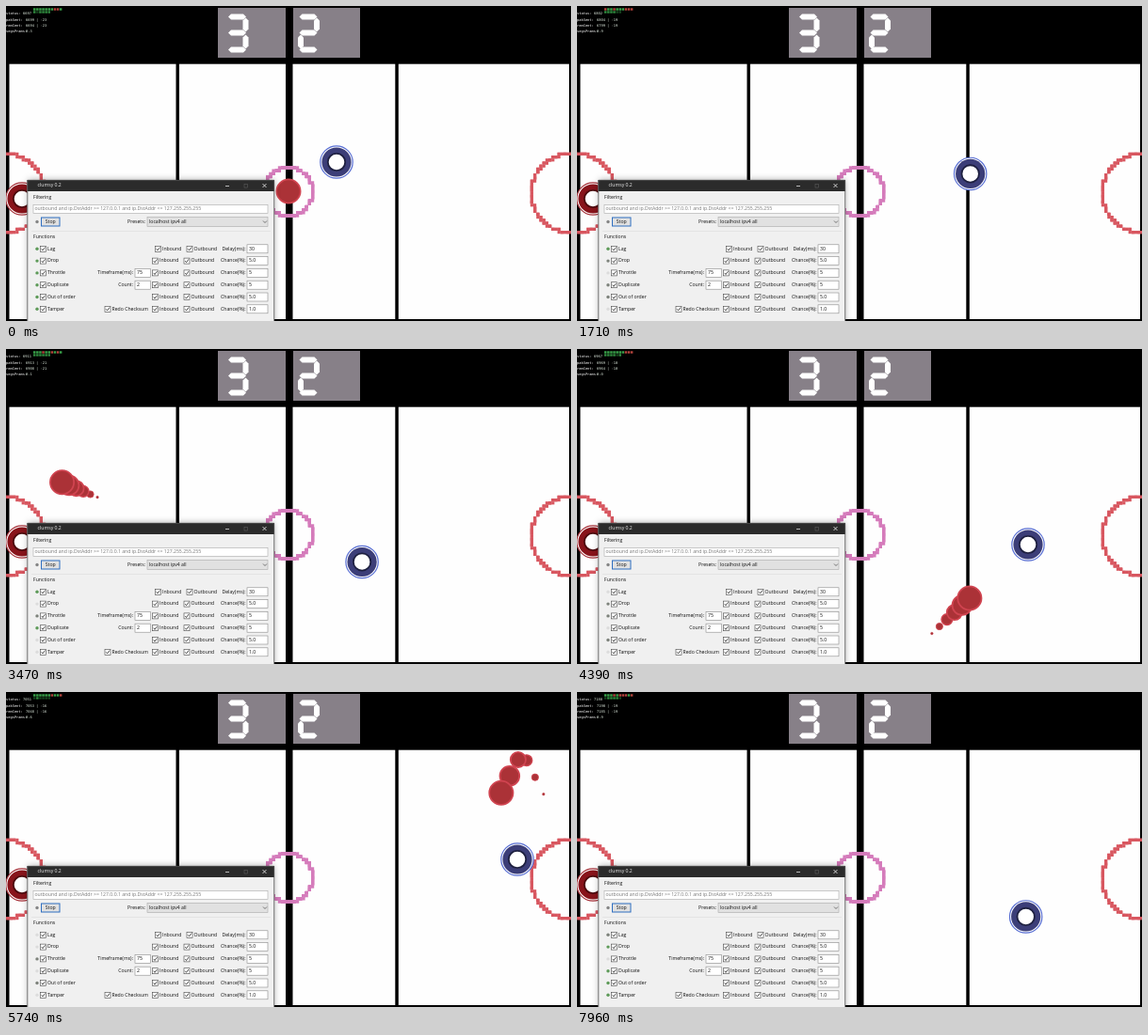
Animation, 600 px wide and 335 px high, one loop 8000 ms. Source, as an HTML page with a canvas:

```html
<!DOCTYPE html>
<html lang="en">
<head>
<meta charset="utf-8">
<title>Air hockey over a bad network</title>
<style>
  html, body { margin: 0; width: 100%; height: 100%; overflow: hidden; background: #000; }
  canvas { display: block; width: 100vw; height: 100vh; }
</style>
</head>
<body>
<canvas id="stage" width="600" height="335"></canvas>
<script>
const ctx = document.getElementById('stage').getContext('2d');
const LOOP = 8000, TICK = 1000 / 60;
const UI = '5.15px "Open Sans", "Noto Sans", sans-serif';
const MONO = '3.7px "DejaVu Sans Mono", "Noto Sans Mono", monospace';

// Each strike sets the puck off in a straight line; the walls reflect it.
const strikes = [
  { at: 0, x: 300, y: 197, vx: 0, vy: 0 },
  { at: 270, x: 300, y: 197, vx: -0.67, vy: -0.3 },
  { at: 683, x: 25, y: 75, vx: 0.24, vy: 0.6 },
  { at: 1000, x: 90, y: 260, vx: 0.16, vy: -0.035 },
  { at: 2100, x: 268, y: 222, vx: 0.08, vy: 0.21 },
  { at: 2870, x: 330, y: 256, vx: -0.45, vy: -0.19 },
  { at: 3560, x: 18, y: 125, vx: 0.48, vy: -0.45 },
  { at: 4470, x: 455, y: 229, vx: 0.1, vy: 0.4 },
  { at: 5600, x: 568, y: 171, vx: 0.54, vy: -1.08 },
  { at: 6300, x: 224, y: 230, vx: -0.05, vy: 0.01 }
];

// Places where the blue player pauses: time, x, y
const stops = [
  [0, 351, 166], [890, 394, 198], [2500, 440, 160], [2870, 352, 240], [4100, 406, 212],
  [4390, 479, 208], [5740, 543, 178], [6530, 318, 203], [LOOP, 477, 239]
];

function reflect(v, low, high) {
  const span = high - low, u = (((v - low) % (2 * span)) + 2 * span) % (2 * span);
  return low + (u < span ? u : 2 * span - u);
}

function puckAt(t) {
  t = Math.max(0, t);
  const { at, x, y, vx, vy } = strikes.findLast(s => s.at <= t);
  return [reflect(x + vx * (t - at), 16, 585), Math.max(72, reflect(y + vy * (t - at), 63, 320))];
}

function malletAt(t) {
  const i = Math.max(1, stops.findIndex(s => s[0] >= t));
  const [t0, x0, y0] = stops[i - 1], [t1, x1, y1] = stops[i];
  const u = (t - t0) / (t1 - t0), eased = u * u * (3 - 2 * u);
  return [x0 + (x1 - x0) * eased, y0 + (y1 - y0) * eased];
}

function noise(a, b) {
  const s = Math.sin(a * 12.9898 + b * 78.233) * 43758.5453;
  return s - Math.floor(s);
}

function rect(x, y, w, h, fill, stroke, width = 0.6) {
  ctx.fillStyle = fill;
  ctx.fillRect(x, y, w, h);
  if (stroke) {
    ctx.strokeStyle = stroke;
    ctx.lineWidth = width;
    ctx.strokeRect(x, y, w, h);
  }
}

function disc(x, y, r, fill, stroke, width = 1) {
  ctx.beginPath();
  ctx.arc(x, y, r, 0, Math.PI * 2);
  ctx.fillStyle = fill;
  ctx.fill();
  if (stroke) {
    ctx.strokeStyle = stroke;
    ctx.lineWidth = width;
    ctx.stroke();
  }
}

function line(color, width, ...points) {
  ctx.beginPath();
  points.forEach(([x, y]) => ctx.lineTo(x, y));
  ctx.strokeStyle = color;
  ctx.lineWidth = width;
  ctx.stroke();
}

function text(str, x, y, color = '#111', font = UI, align = 'left') {
  ctx.font = font;
  ctx.textAlign = align;
  ctx.textBaseline = 'middle';
  ctx.fillStyle = color;
  ctx.fillText(str, x, y);
}

function pixelRing(cx, cy, r, color) {
  const size = 3.2;
  for (let a = 0; a < Math.PI * 2; a += 0.03) {
    const x = cx + Math.round(r * Math.cos(a) / size) * size;
    const y = cy + Math.round(r * Math.sin(a) / size) * size;
    rect(x - size / 2, y - size / 2, size, size, color);
  }
}

function segment(x, y, length, vertical) {
  const h = 3, pts = [[0, 0], [h, -h], [length - h, -h], [length, 0], [length - h, h], [h, h]];
  ctx.beginPath();
  pts.forEach(([a, b]) => vertical ? ctx.lineTo(x + b, y + a) : ctx.lineTo(x + a, y + b));
  ctx.fillStyle = '#fff';
  ctx.fill();
}

function scoreDigit(x, lowerX) {
  [11.5, 28.5, 46.5].forEach(y => segment(x, y, 19, false));
  segment(x + 18.5, 12.5, 15, true);
  segment(lowerX, 30.5, 15, true);
}

function drawTable() {
  rect(0, 0, 600, 335, '#000');
  rect(3.5, 61.7, 594.5, 271.3, '#fefefe');
  [[180.5, 3.5], [297, 7.5], [413.3, 3.5]].forEach(([x, w]) => rect(x, 61, w, 273, '#000'));
  pixelRing(300, 197.5, 25.5, '#d57bbb');
  pixelRing(-1, 199, 42, '#d8565f');
  pixelRing(600, 199, 42, '#d8565f');
  rect(225, 2, 72, 53, '#878088');
  rect(305, 2, 71, 53, '#878088');
  scoreDigit(236, 254.5);
  scoreDigit(311.5, 313);
}

function drawStats(t) {
  const count = 6697 + Math.floor(t * 0.0617), step = Math.floor(t / 46.67);
  const lag = 5 + Math.floor(noise(step, 9) * 20);
  [['status:', count], ['pakSent:', `${count + 2} | -${lag}`],
   ['remCent:', `${count - 3} | -${lag}`], ['segsPrams:', '0.' + lag % 10]]
    .forEach(([label, value], i) => {
      text(label, 0, 8.5 + i * 6.2, '#fff', MONO);
      text(value, i ? 21 : 18, 8.5 + i * 6.2, '#e4f0e4', MONO);
    });
  for (let i = 0; i < 10; i++) {
    const x = 29 + i * 3.1, ok = noise(step, i) < 0.8;
    rect(x, 2.3, 2.5, 2.4, i < 6 === ok ? '#39a34a' : '#b5443d');
    if (i < 6) rect(x, 5.3, 2.5, 2.4, noise(step, i + 20) < 0.7 ? '#2f8a3e' : '#17441f');
  }
}

function drawMallet(x, y, body, rim, dark) {
  disc(x, y, 17.2, '#fff', rim, 1.2);
  disc(x, y, 15.6, body);
  disc(x, y, 9.2, '#fff', dark, 1.8);
}

function drawPuck(t) {
  for (let age = 5; age >= 0; age--) {
    const r = 12.6 * (1 - age / 5.6);
    disc(...puckAt(t - age * TICK), r, '#ab3237', '#d04450', Math.min(1.8, r / 4));
  }
}

function check(x, y, label) {
  rect(x, y - 3, 6, 6, '#fff', '#444');
  line('#222', 0.8, [x + 1.2, y], [x + 2.5, y + 1.6], [x + 4.9, y - 1.7]);
  text(label, x + 7.5, y);
}

function field(x, y, w, value) {
  rect(x, y - 4.5, w, 9, '#fff', '#8a8a8a');
  text(value, x + 2, y);
}

function light(y, row, t) {
  const n = noise(Math.floor(t / 140), row);
  disc(33, y, 1.7, n < 0.4 ? '#5d9a58' : n < 0.65 ? '#7d827b' : '#dcdcdc');
}

function drawWindow(t) {
  ctx.shadowColor = 'rgba(0, 0, 0, 0.35)';
  ctx.shadowBlur = 7;
  rect(22.5, 185, 262.5, 155, '#f0f0f0');
  ctx.shadowBlur = 0;
  rect(22.5, 185, 262.5, 12, '#2b2b2b');
  line('#555', 0.8, [22.8, 335], [22.8, 185.3], [284.7, 185.3], [284.7, 335]);
  text('clumsy 0.2', 33.5, 191, '#eee');
  line('#ddd', 0.8, [233, 191.5], [237, 191.5]);
  rect(253, 189.5, 3.6, 3.6, '#2b2b2b', '#5a5a5a');
  line('#eee', 0.8, [272.5, 189], [276.5, 193]);
  line('#eee', 0.8, [276.5, 189], [272.5, 193]);

  text('Filtering', 29, 203.5);
  rect(29, 211.5, 249, 9, '#fff', '#aaa');
  text('outbound and ip.DstAddr >= 127.0.0.1 and ip.DstAddr <= 127.255.255.255', 30.5, 216, '#777');
  disc(33, 229.5, 1.7, '#858585');
  rect(37.5, 225, 19.5, 9, '#e1e1e1', '#2f6fc0', 1);
  text('Stop', 47.2, 229.5, '#111', UI, 'center');
  text('Presets:', 148, 229.5, '#111', UI, 'right');
  rect(150, 224.5, 128, 10, '#e1e1e1', '#aaa');
  text('localhost ipv4 all', 152, 229.5);
  line('#444', 0.7, [273, 228.5], [275, 230.5], [277, 228.5]);
  line('#dcdcdc', 0.6, [27, 239.5], [281, 239.5]);

  text('Functions', 29, 246);
  const rowY = row => 258.3 + row * 12.8;
  [['Lag', '30'], ['Drop', '5.0'], ['Throttle', '5'], ['Duplicate', '5'], ['Out of order', '5.0'], ['Tamper', '1.0']]
    .forEach(([name, value], row) => {
      const y = rowY(row), shift = row ? 0 : 3;
      light(y, row, t);
      check(36.5, y, name);
      check(155.5 + shift, y, 'Inbound');
      check(189 + shift, y, 'Outbound');
      text(row ? 'Chance(%):' : 'Delay(ms):', 254.5, y, '#111', UI, 'right');
      field(256, y, 22, value);
    });
  [['Timeframe(ms):', '75'], ['Count:', '2']].forEach(([label, value], i) => {
    text(label, 135, rowY(i + 2), '#111', UI, 'right');
    field(137, rowY(i + 2), 16.5, value);
  });
  check(105, rowY(5), 'Redo Checksum');
}

function draw(now) {
  const t = now % LOOP;
  drawTable();
  drawStats(t);
  drawMallet(17, 205, '#88141b', '#a8343c', '#4c080c');
  drawPuck(t);
  drawMallet(...malletAt(t), '#3c3e78', '#5a70d4', '#1e2040');
  drawWindow(t);
  requestAnimationFrame(draw);
}
draw(0);
</script>
</body>
</html>
```
